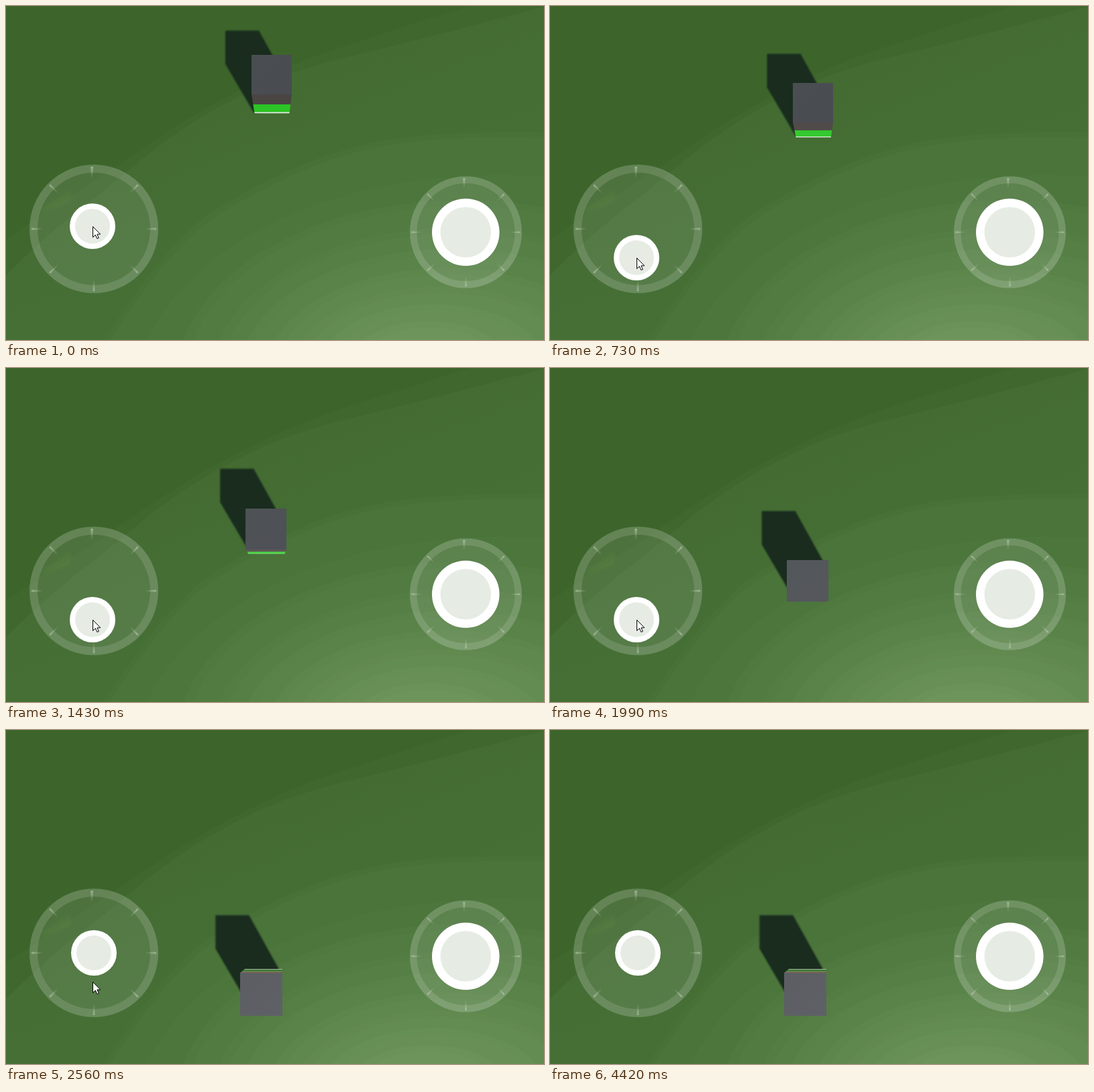
An HTML page with a canvas that plays this animation: 802x499 px, repeating every 4.72 s.

```html
<!DOCTYPE html>
<html lang="en">
<head>
<meta charset="utf-8">
<title>Twin stick cube</title>
<style>
  html, body { margin: 0; width: 100%; height: 100%; overflow: hidden; background: #3d652b; }
  canvas { display: block; width: 100vw; height: 100vh; }
</style>
</head>
<body>
<canvas id="stage" width="802" height="499"></canvas>
<script>
const W = 802, H = 499, LOOP = 4720, TAU = Math.PI * 2;
const STEP = 142.2, LAST = 18;  // the scene advances in even steps, then rests
const ctx = document.getElementById('stage').getContext('2d');

const lerp = (a, b, k) => a + (b - a) * k;
const mix = (a, b, k) => `rgb(${a.map((v, i) => Math.round(lerp(v, b[i], k))).join()})`;
const ease = k => { k = Math.min(1, k); return k * k * (3 - 2 * k); };

// Rest, a short ramp, then constant speed.
const travel = n => 0.5 * Math.log(1 + Math.exp((n - 2.8) / 0.5));

function poly(c, fill, pts) {
  c.beginPath();
  pts.forEach(([x, y]) => c.lineTo(x, y));
  c.closePath();
  c.fillStyle = fill;
  c.fill();
}

function oval(c, fill, x, y, rx, ry = rx) {
  c.beginPath();
  c.ellipse(x, y, rx, ry, 0, 0, TAU);
  c.fillStyle = fill;
  c.fill();
}

// Fills everything below a smooth curve guided by the points.
function hill(c, fill, pts) {
  const n = pts.length;
  c.beginPath();
  c.moveTo(...pts[0]);
  for (let i = 1; i < n - 1; i++) {
    const [x, y] = pts[i], [u, v] = pts[i + 1];
    if (i < n - 2) c.quadraticCurveTo(x, y, (x + u) / 2, (y + v) / 2);
    else c.quadraticCurveTo(x, y, u, v);
  }
  c.lineTo(W, H);
  c.lineTo(0, H);
  c.fillStyle = fill;
  c.fill();
}

function drawGround(c) {
  c.fillStyle = '#3d652b';
  c.fillRect(0, 0, W, H);
  hill(c, '#40682e', [[0, 348], [100, 282], [225, 198], [300, 150],
    [430, 84], [600, 29], [700, -3], [W, -30]]);
  const slope = c.createLinearGradient(420, 97, 500, 300);
  slope.addColorStop(0, '#436b32');
  slope.addColorStop(1, '#466f36');
  hill(c, slope, [[0, 402], [60, 343], [150, 273], [225, 210], [310, 153],
    [430, 95], [600, 55], [W, 1]]);
  const ridge = [[145, H], [240, 350], [380, 262], [520, 206], [660, 188], [W, 188]];
  hill(c, '#487138', ridge);
  hill(c, '#4a743a', ridge.map(([x, y]) => [x + 5, y + 7]));
  oval(c, '#4c763c', 735, 590, 545, 338);
  const rim = [79, 121, 63], core = [107, 147, 89];
  for (let i = 0; i < 7; i++) {
    const k = i / 6;
    const ry = lerp(270, 64, Math.pow(k, 0.85)), wide = lerp(1.58, 1.85, k);
    const band = (shade, r) => oval(c, mix(rim, core, shade),
      lerp(680, 630, k), lerp(560, 535, k), r * wide, r);
    band(k, ry);
    band(k + 0.06, ry - 9);
  }
}

function drawPad(c, x, y, size) {
  c.save();
  c.translate(x, y);
  c.scale(size / 96, size / 96);
  oval(c, 'rgba(255,255,255,.09)', 0, 0, 96);
  c.beginPath();
  c.arc(0, 0, 90, 0, TAU);
  c.lineWidth = 12;
  c.strokeStyle = 'rgba(255,255,255,.125)';
  c.stroke();
  const fade = c.createLinearGradient(0, -93, 0, -76);
  fade.addColorStop(0, 'rgba(225,238,215,.42)');
  fade.addColorStop(1, 'rgba(225,238,215,0)');
  for (let i = 0; i < 8; i++) {
    const half = i ? 1.4 : 2, mid = i ? 0 : -3;
    poly(c, fade, [[mid - half, -93], [mid + half, -93], [mid + 1, -76], [mid - 1, -76]]);
    c.rotate(TAU / 8);
  }
  c.restore();
}

function drawKnob(x, y, r, core) {
  oval(ctx, '#fff', x, y, r);
  oval(ctx, '#e6ece4', x, y, core);
}

function drawCube(n) {
  const depth = 36.7 + 15.8 * travel(n);
  const x = 325 - (depth - 44) * 0.0545 + Math.max(0, 1.6 - 0.55 * n);
  const y = 82 + 1.207 * (depth - 44);
  const k = (y - 73) / 290;
  const edge = x + 38.6 - (depth - 100) * 0.009;
  const left = Math.round(edge), right = Math.round(edge + lerp(59.5, 62.3, k));
  const top = Math.round(y), bottom = Math.round(y + 59 + 5.2 * k * k);
  const base = 160 + 0.857 * (y - 73);

  ctx.save();
  ctx.filter = 'blur(1.3px)';
  const shadow = [[0, 0], [50, 0], [94, 79.5], [93, 119], [43, 123.5], [0, 50]];
  poly(ctx, '#192c1e', shadow.map(([u, v]) => [x + u, depth + v]));
  ctx.restore();

  if (base > bottom) {
    const inset = lerp(3.5, 1, k);
    const band = (a, b, fill) => {
      const row = q => lerp(bottom, base, q);
      poly(ctx, fill, [[left + 4.5 * a, row(a)], [right - inset * a, row(a)],
        [right - inset * b, row(b)], [left + 4.5 * b, row(b)]]);
    };
    band(0, 0.54, mix([74, 69, 67], [112, 106, 107], k));
    band(0.53, 0.95, mix([43, 196, 37], [112, 232, 104], k));
    band(0.94, 1, '#e4f1e1');
  }

  // The far side comes into view low on the stage.
  const back = (y - 290) * 0.082;
  if (back > 0) {
    const row = q => top - back * q;
    const strip = (a, b, fill) => poly(ctx, fill, [[left + 7 * a, row(a)],
      [right, row(a)], [right, row(b)], [left + 7 * b, row(b)]]);
    strip(0, 1, '#2f6b28');
    strip(0.84, 1, '#a9c3a0');
    strip(0.36, 0.54, '#7fa074');
    strip(0, 0.24, '#8a655c');
  }

  const face = ctx.createLinearGradient(left, top, right, bottom);
  face.addColorStop(0, mix([74, 78, 81], [91, 94, 98], k * k));
  face.addColorStop(1, mix([73, 76, 82], [95, 96, 103], k * k));
  ctx.fillStyle = face;
  ctx.fillRect(left, top, right - left, bottom - top);
}

function drawMouse(x, y) {
  ctx.save();
  ctx.translate(x + 0.5, y + 0.5);
  poly(ctx, '#fff', [[0, 0], [0, 16], [3.8, 12.5], [6.3, 18], [8.8, 17],
    [6.4, 11.5], [11.2, 11.5]]);
  ctx.strokeStyle = '#000';
  ctx.stroke();
  ctx.restore();
}

function mouseAt(t, n) {
  if (t < 3710) return [129, Math.round(lerp(329, 376, ease(n / 4.2)))];
  if (t < 4140 || t >= 4420) return null;
  return t < 4290 ? [692, 378] : [736, 481];
}

function layer(paint) {
  const c = document.createElement('canvas');
  c.width = W;
  c.height = H;
  paint(c.getContext('2d'));
  return c;
}

const ground = layer(drawGround);
const pads = layer(c => {
  c.filter = 'blur(2px)';
  poly(c, 'rgba(78,132,52,.22)', [[51, 311], [58, 300], [96, 276], [96, 292]]);
  c.filter = 'none';
  drawPad(c, 131, 333, 96);
  drawPad(c, 685.5, 338, 83.5);
});

function draw(t) {
  const n = Math.min(LAST, Math.floor((t + 9) / STEP));
  ctx.drawImage(ground, 0, 0);
  drawCube(n);
  ctx.drawImage(pads, 0, 0);
  if (n < LAST) drawKnob(129, Math.round(lerp(329, 376, ease(n / 4.8))), 34, 26);
  else drawKnob(131, 333, 34, 26);
  drawKnob(685.3, 338, 50.3, 37.8);
  const mouse = mouseAt(t, n);
  if (mouse) drawMouse(...mouse);
}

const start = performance.now();
function tick() {
  draw((performance.now() - start) % LOOP);
  requestAnimationFrame(tick);
}
tick();
</script>
</body>
</html>
```
